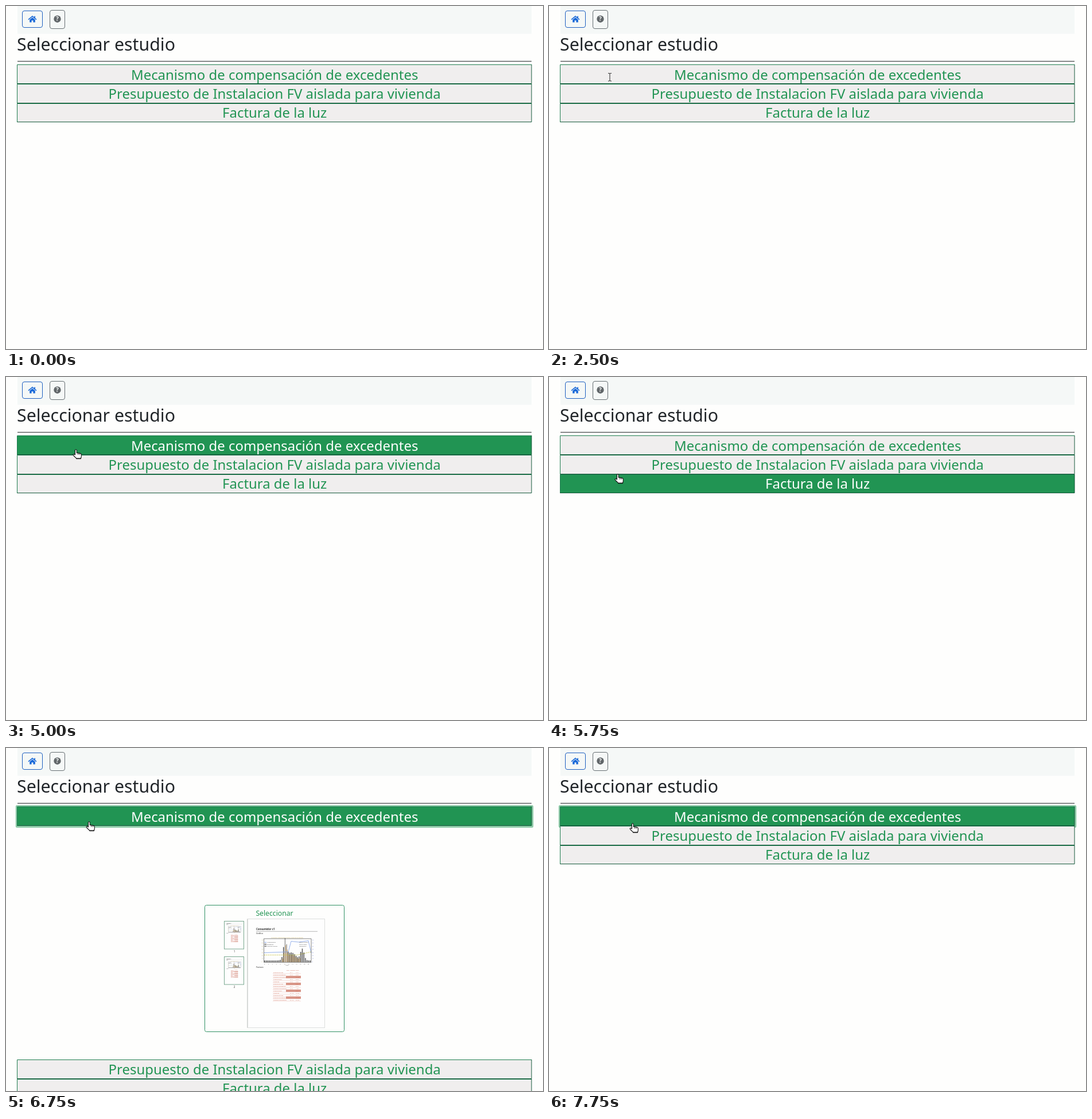
An HTML page for the animation above (8000 ms loop, 936 px wide and 599 px high).

```html
<!DOCTYPE html>
<html lang="es">
<head>
<meta charset="utf-8">
<title>Seleccionar estudio</title>
<style>
  html, body { margin: 0; width: 100%; height: 100%; overflow: hidden; background: #fefefd; }
  svg { display: block; width: 936px; height: 599px; font-family: "Noto Sans", "Open Sans", sans-serif; }
  .row { font-size: 23.93px; text-anchor: middle; }
  .row .face { fill: #f0eeee; }
  .row text { fill: #219453; }
  .row.on .face { fill: #219453; }
  .row.on text { fill: #fdfefd; }
  .lit { fill: none; stroke: #1f7d50; }
  .dim { fill: none; stroke: #14583a; }
  .cursor { display: none; stroke-linejoin: round; stroke-linecap: round; }
</style>
</head>
<body>
<svg viewBox="0 0 936 599">
  <rect width="936" height="599" fill="#fefefd"/>
  <rect x="20" width="896" height="48.5" fill="#f5f8f7"/>

  <rect id="homeRing" x="26.5" y="6.5" width="39" height="34" rx="5" fill="none" stroke="#8db6f3" stroke-width="3"/>
  <rect x="28.5" y="8.5" width="35" height="29" rx="3.5" fill="#f5f8f7" stroke="#1d5fc0"/>
  <rect id="homeFill" x="28" y="8" width="36" height="30" rx="4" fill="#1a6be0"/>
  <g id="homeIcon">
    <path d="M39.4 23.3L46 17.8L52.6 23.3" fill="none" stroke="currentColor" stroke-width="1.5" stroke-linecap="round" stroke-linejoin="round"/>
    <path d="M41.2 24L46 20L50.8 24V28.5H47.4V25.2H44.6V28.5H41.2zM49.2 17.8H51V21.2L49.2 19.7z" fill="currentColor"/>
  </g>

  <rect x="76.5" y="7.5" width="26" height="32" rx="3.5" fill="none" stroke="#666e72"/>
  <circle cx="89.5" cy="22.7" r="6.2" fill="#62676a"/>
  <text x="89.5" y="26.3" font-size="10" font-weight="800" fill="#f5f8f7" text-anchor="middle">?</text>

  <text x="19" y="78" font-size="30.3" fill="#212529">Seleccionar estudio</text>
  <rect x="20" y="96" width="896" height="1" fill="#24282b"/>

  <g id="panel">
    <rect x="346.5" y="274.5" width="243" height="221" rx="3" fill="#fefefd" stroke="#2f9163"/>
    <text x="468" y="293" font-size="12.2" fill="#219453" text-anchor="middle">Seleccionar</text>
    <rect x="420.5" y="298.5" width="135" height="190" fill="#fefefe" stroke="#dcdedd"/>
    <path d="M421 299V488" stroke="#cfd3d1" stroke-width="1.5"/>
    <g id="page"></g>
    <g id="thumbs"></g>
  </g>

  <rect id="rowRing" x="18.5" y="101.5" width="899" height="36" rx="1" fill="none" stroke="#90cba9" stroke-width="3.5"/>
  <g id="first"></g>
  <g id="lower"><rect x="21" y="137" width="894" height="470" fill="#fefefd"/></g>

  <g id="arrow" class="cursor">
    <path d="M.8 .8V15.2L4.2 12L6.6 17.8L9.1 16.7L6.7 11.1H11.6z" fill="#fff" stroke="#111"/>
  </g>
  <g id="beam" class="cursor" fill="none">
    <path id="stem" d="M1.5 1.5H3.2L4 2.3L4.8 1.5H6.5M4 2.3V14.2M1.5 15H3.2L4 14.2L4.8 15H6.5" stroke="#222"/>
  </g>
  <g id="hand" class="cursor">
    <path d="M4.4 10V2.3q0-1.5 1.4-1.5t1.4 1.5V6.4l5.9 1q2.2.4 2.2 2.4v2.6q0 2-1.2 4H7L2 11.5Q.4 9.7 1.6 9q1.2-.6 2.8 1z" fill="#fff" stroke="#111" stroke-width="1.1"/>
    <path d="M9.6 7.6V9.6M12.2 8V9.8" stroke="#111" stroke-width=".8"/>
    <path d="M7 16.5H14" stroke="#111" stroke-width="1.7"/>
  </g>
</svg>
<script>
const $ = id => document.getElementById(id);
const add = (parent, markup) => parent.insertAdjacentHTML('beforeend', markup);
const clamp = v => Math.min(1, Math.max(0, v));
const smooth = v => (v = clamp(v), v * v * (3 - 2 * v));
const rect = (x, y, w, h, fill) => `<rect x="${x}" y="${y}" width="${w}" height="${h}" fill="${fill}"/>`;
const text = (x, y, size, fill, str, extra = '') =>
  `<text x="${x}" y="${y}" font-size="${size}" fill="${fill}" ${extra}>${str}</text>`;
const line = (d, color, width, extra = '') =>
  `<path d="${d}" fill="none" stroke="${color}" stroke-width="${width}" ${extra}/>`;

const rowTop = i => Math.round(102.3 + 33.6 * i);

const rows = [
  'Mecanismo de compensación de excedentes',
  'Presupuesto de Instalacion FV aislada para vivienda',
  'Factura de la luz'
].map((label, i) => {
  const top = rowTop(i), bottom = rowTop(i + 1);
  const box = $(i ? 'lower' : 'first');
  add(box, `<g class="row">
    <rect class="face" x="20" y="${top}" width="896" height="${bottom - top}"/>
    <path class="lit" d="M19.5 ${bottom}V${top + .5}H916"/>
    <path class="dim" d="M916 ${top}V${bottom - .5}H19.5"/>
    <text x="468.2" y="${128.8 + 33.2 * i}">${label}</text></g>`);
  return box.lastElementChild;
});

function drawChart() {
  const ink = '#2b2b2b', blue = '#7d9fe8';
  const bump = (i, mid, width) => Math.exp(-(((i - mid) / width) ** 2));
  let s = '';
  for (let i = 0; i < 30; i++) {
    const x = 450.2 + i * 2.73;
    const h = 3 + 34 * bump(i, 13, 1.4) + 14 * bump(i, 17, 4) + 20 * bump(i, 24, 1.6);
    s += rect(x, 374 - h, 1.5, h, h > 30 ? '#999' : '#555');
    if (i > 10 && i < 23) s += rect(x + 1.4, 374 - h * .7, 1.1, h * .7, '#e3b878');
  }
  s += line('M450 357.5L492 356L497 337.5L510 339L527 336.5L532 358', blue, .8)
    + line('M450 361.5H507L532 356', '#c8c23e', .9, 'stroke-dasharray="2 1.2"')
    + line('M449.5 333H532V374.3H449.5z', '#333', .6);
  for (let i = 0; i < 8; i++) {
    const y = 336 + i * 5.4, value = 70 - i * 10;
    s += text(445.5, y, 2.2, '#b8a94b', value) + text(533.5, y, 2.2, '#5a6fd0', value);
  }
  ['Autoconsumo|Precio compra', 'Excedente|Precio venta', 'Consumo de red|Generación'].forEach((pair, i) => {
    const y = 340.2 + i * 3.3, [left, right] = pair.split('|');
    s += line(`M450.5 ${y - .8}h3.5`, i ? '#222' : blue, 1)
      + text(455, y, 2.3, ink, left) + text(511, y, 2.3, ink, right);
  });
  for (let i = 0; i < 12; i++) s += text(450 + i * 6.9, 377.5, 2.1, ink, i * 2);
  return s + text(490, 379.8, 2.3, ink, 'hora', 'text-anchor="middle"');
}

function drawBill() {
  const red = '#c8553d';
  const labels = ['Potencia', 'Energía de red', 'Energía excedente', 'Término de energía', 'Total factura'];
  let s = text(489, 389.2, 2.4, red, 'kWh') + text(495, 389.2, 2.4, red, 'Unitario') + text(505, 389.2, 2.4, red, 'Total');
  for (let i = 1; i < 14; i++) {
    const y = 387 + i * 4, full = i % 3 === 0;
    if (full) s += rect(488, y - 1, 26, 4, '#d79486');
    else s += text(495, y + 2.2, 2.4, red, '0.1' + i);
    s += line(`M465 ${y + 3}H514`, '#e2aaa0', .4)
      + text(466, y + 2.2, 2.5, red, labels[i % 5])
      + text(505, y + 2.2, 2.4, red, (i * 7 % 11) + '.4' + i);
  }
  return s;
}

function drawPanel() {
  const ink = '#2b2b2b';
  add($('page'), text(436, 318.3, 4.4, ink, 'Consumidor c1', 'font-weight="600"')
    + line('M436 320.3H543', '#999', .7)
    + text(436, 325.3, 3.6, ink, 'Gráfico')
    + text(490, 332, 2.3, '#c9a93c', 'Consumo y generación horaria, precio de la energía', 'text-anchor="middle"')
    + drawChart()
    + text(436, 383.8, 3.6, ink, 'Factura')
    + drawBill());
  for (const n of [1, 2]) {
    const y = 240 + 62 * n;
    add($('thumbs'), `<rect x="380.5" y="${y + .5}" width="34" height="48.5" fill="#fefefe" stroke="#79a78f"/>
      <use href="#page" transform="translate(380 ${y}) scale(.26) translate(-420 -298)"/>`
      + text(398, y + 54.5, 4.5, '#333', n, 'text-anchor="middle"'));
  }
}

// Pointer path: time, shape, left, top
const path = [
  [0, ''],
  [1250, 'arrow', 258, 334],
  [1500, 'arrow', 269, 334],
  [2500, 'beam', 102, 116],
  [2750, 'beam', 69, 60],
  [3000, 'hand', 40, 18],
  [4500, 'arrow', 114, 87],
  [4750, 'hand', 116, 112],
  [5000, 'hand', 116, 126],
  [5250, 'hand', 116, 142],
  [5500, 'hand', 114, 144],
  [5750, 'hand', 114, 169],
  [6000, 'hand', 130, 135],
  [6250, 'hand', 138, 128],
  [6500, 'hand', 139, 128],
  [7750, 'hand', 140, 131]
];
const cursors = ['arrow', 'beam', 'hand'].map($);
const tickMs = 250, homeClick = 3500, reload = 3750, rowClick = 6500, closing = 6994;

function show(t) {
  const [, kind, x, y] = path.findLast(p => p[0] <= t);
  for (const c of cursors) c.style.display = c.id === kind ? 'inline' : 'none';
  if (kind) $(kind).setAttribute('transform', `translate(${x} ${y})`);

  const tip = kind === 'hand' ? y + 1 : -1;
  rows.forEach((row, i) => row.classList.toggle('on', tip >= rowTop(i) && tip < rowTop(i + 1)));

  // The button fades in as the pointer nears and resets while the page reloads
  const fill = t === reload || t >= 4500 ? 0 : clamp((t - 2500) / 500);
  $('homeFill').style.opacity = fill;
  $('homeIcon').style.color = fill ? '#fff' : '#1a69d8';
  $('homeRing').style.opacity = t === homeClick ? 1 : 0;

  const height = Math.round(500 * (smooth((t - rowClick) / 344) - smooth((t - closing) / 550)));
  $('rowRing').style.opacity = t >= rowClick ? 1 : 0;
  $('panel').style.display = height ? 'inline' : 'none';
  $('lower').setAttribute('transform', `translate(0 ${height})`);
}

let shown = -1;
function tick() {
  const now = performance.now() % 8000;
  const t = now - now % tickMs;
  if (t !== shown) show(shown = t);
  requestAnimationFrame(tick);
}

drawPanel();
tick();
</script>
</body>
</html>
```
